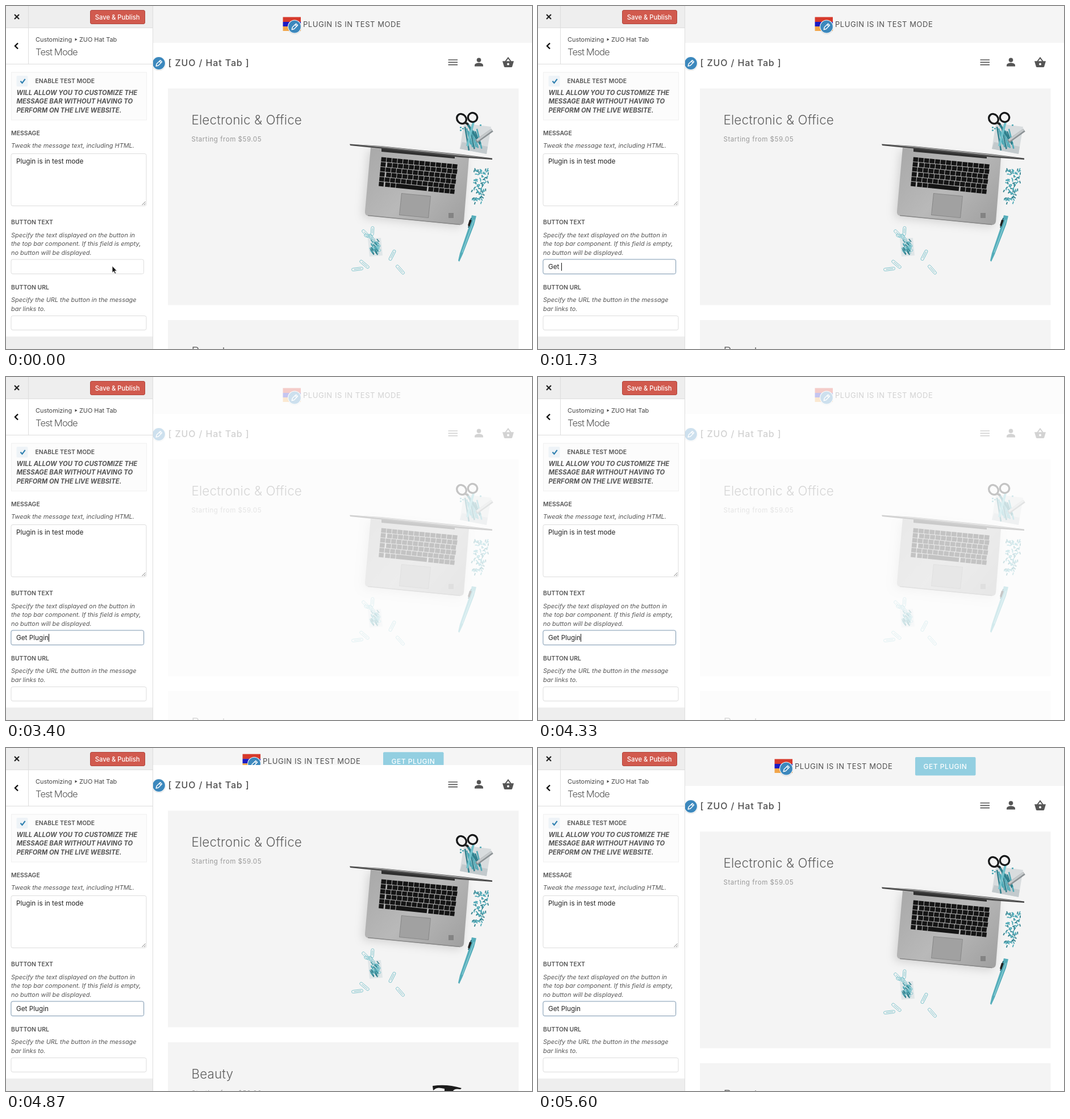
Write an HTML page with a canvas that moves like this. It is 926 by 605 pixels and loops after 5.67 s.

```html
<!DOCTYPE html>
<html lang="en">
<head>
<meta charset="utf-8">
<title>Test Mode</title>
<style>
html, body { margin: 0; width: 100%; height: 100%; overflow: hidden; background: #fff; }
#stage { position: relative; width: 926px; height: 605px; overflow: hidden; background: #fff; }
#view, #page, #bar, #side, #page > *, #bar > svg { position: absolute; left: 0; top: 0; }
#view { width: 926px; height: 605px; }
#bar { width: 926px; overflow: hidden; background: #f5f5f5; }
svg { display: block; font-family: Inter, "Open Sans", sans-serif; }
#side text { font-size: 11.2px; fill: #444; }
#side .label { font-size: 10.45px; font-weight: 600; fill: #555; }
#side .hint { font-size: 10.95px; font-style: italic; fill: #555; }
#side .strong { font-size: 11.25px; font-weight: 700; font-style: italic; fill: #555; }
#side .field { font-size: 11.75px; fill: #222; }
.head { font-size: 22.4px; font-weight: 300; letter-spacing: .15px; fill: #606060; }
.price { font-size: 11.5px; letter-spacing: .55px; fill: #999; }
.box { fill: #fff; stroke: #ddd; }
</style>
</head>
<body>
<div id="stage">
  <div id="view">
    <div id="page">
      <canvas id="art" width="926" height="700"></canvas>
      <svg width="926" height="700">
        <text x="285.5" y="106.3" font-size="16" font-weight="500" letter-spacing=".88" fill="#505050">[ ZUO / Hat Tab ]</text>
        <use href="#pencil" x="269" y="101"/>
        <path d="M778.5 95h16.5M778.5 99.3h16.5M778.5 103.6h16.5" stroke="#555" stroke-width="1.7"/>
        <g fill="#555">
          <circle cx="832.5" cy="95.3" r="3.8"/>
          <path d="M825 106.5v-2c0-3 5-4.3 7.5-4.3s7.5 1.3 7.5 4.3v2z"/>
        </g>
        <path d="M879 98l5-6.5 5 6.5" fill="none" stroke="#555" stroke-width="2"/>
        <path d="M874 97.2h20l-2.8 9.6q-.4 1.2-1.7 1.2h-11q-1.3 0-1.7-1.2z" fill="#555"/>
        <circle cx="884" cy="102.6" r="2" fill="#fff"/>
        <text class="head" x="326.5" y="209.3">Electronic &amp; Office</text>
        <text class="price" x="326.5" y="239">Starting from $59.05</text>
        <text class="head" x="326.5" y="618.3">Beauty</text>
        <text class="price" x="326.5" y="648">Starting from $59.00</text>
      </svg>
    </div>
    <div id="bar">
      <svg id="barArt" width="926" height="67">
        <g id="notice">
          <path d="M487.5 19.5h31.5v8.500h-31.5z" fill="#d63a2c"/>
          <path d="M487.5 28h31.5v8h-31.5z" fill="#1b1bc4"/>
          <path d="M487.5 36h31.5v8h-31.5z" fill="#f2a64a"/>
          <use href="#pencil" x="508" y="36.5"/>
          <text x="523" y="36.6" font-size="13" letter-spacing=".57" fill="#505050">PLUGIN IS IN TEST MODE</text>
        </g>
        <g id="button">
          <rect x="664" y="16" width="106.5" height="32.5" rx="2" fill="#93cfe1"/>
          <text x="678.5" y="36.6" font-size="12" font-weight="500" letter-spacing=".5" fill="#fff">GET PLUGIN</text>
        </g>
      </svg>
    </div>
  </div>

  <svg id="side" width="259" height="605">
    <defs>
      <g id="pencil">
        <circle r="12.5" fill="#000" opacity=".12" cy=".6"/>
        <circle r="12" fill="#fff"/>
        <circle r="10.9" fill="#3c88bd"/>
        <path d="M-4.8 5l1-4L2.6-5.3l2.9 2.9-6.3 6.400zM.8-3.6l2.9 2.9" fill="none" stroke="#fff" stroke-width="1.4" stroke-linejoin="round"/>
      </g>
    </defs>
    <rect width="259" height="605" fill="#fff"/>
    <rect width="259" height="39" fill="#eee"/>
    <rect y="583" width="259" height="22" fill="#eee"/>
    <path d="M0 38.5h258M39.5 0v102M0 102.5h258M258.5 0v605" stroke="#ddd"/>
    <path d="M15 15l8 8m0-8l-8 8" stroke="#222" stroke-width="2.2"/>
    <path d="M21 65.5l-5 5 5 5" fill="none" stroke="#111" stroke-width="2.4"/>
    <rect x="148.5" y="7.5" width="96" height="24" rx="2.5" fill="#d15a4e" stroke="#b2443b"/>
    <text x="156.8" y="23.7" font-weight="500" style="fill:#fff">Save &amp; Publish</text>
    <text x="52" y="62.6" style="font-size:10.9px">Customizing</text>
    <path d="M121.5 56.8l4 2.3-4 2.3z" fill="#444"/>
    <text x="129" y="62.6" style="font-size:10.9px">ZUO Hat Tab</text>
    <text x="52" y="87" style="font-size:16.5px;font-weight:300;letter-spacing:-.8px;fill:#555">Test Mode</text>

    <rect x="9.5" y="117" width="238" height="84" fill="#fcfcfc" stroke="#f0f0f0"/>
    <rect x="18.5" y="123" width="20" height="19" rx="2" fill="#eef3f7"/>
    <path d="M25.5 132.5l3 3.3 5.2-7" fill="none" stroke="#2f80b0" stroke-width="2.2"/>
    <text class="label" x="51.5" y="136.3">ENABLE TEST MODE</text>
    <text class="strong" x="18.5" y="156.5">WILL ALLOW YOU TO CUSTOMIZE THE</text>
    <text class="strong" x="18.5" y="172.1">MESSAGE BAR WITHOUT HAVING TO</text>
    <text class="strong" x="18.5" y="187.7">PERFORM ON THE LIVE WEBSITE.</text>

    <text class="label" x="9" y="227.8">MESSAGE</text>
    <text class="hint" x="9" y="250.3">Tweak the message text, including HTML.</text>
    <rect class="box" x="9" y="260.5" width="238" height="92" rx="3"/>
    <path d="M239.5 351l6-6m-2.5 6l2.5-2.5" stroke="#777"/>
    <text class="field" x="18" y="278">Plugin is in test mode</text>

    <text class="label" x="9" y="385">BUTTON TEXT</text>
    <text class="hint" x="9" y="407.7">Specify the text displayed on the button in</text>
    <text class="hint" x="9" y="423.3">the top bar component. If this field is empty,</text>
    <text class="hint" x="9" y="438.9">no button will be displayed.</text>
    <rect id="glow" x="9" y="447" width="233.5" height="25.5" rx="3" fill="none" stroke="#5b9dd9" stroke-opacity=".12" stroke-width="3"/>
    <rect id="entry" class="box" x="9" y="447" width="233.5" height="25.5" rx="3"/>
    <text id="typed" class="field" x="18" y="464.2"></text>
    <rect id="caret" y="453" width="1" height="14" fill="#111"/>

    <text class="label" x="9" y="499.8">BUTTON URL</text>
    <text class="hint" x="9" y="522.3">Specify the URL the button in the message</text>
    <text class="hint" x="9" y="537.9">bar links to.</text>
    <rect class="box" x="9" y="546.5" width="238" height="25" rx="3"/>
    <path id="mouse" d="M187 458.5v12l2.7-2.5 2 4.3 1.9-.9-2-4.2h3.7z" fill="#111" stroke="#fff" stroke-width=".8"/>
  </svg>
</div>

<script>
const $ = id => document.getElementById(id);
const c = $('art').getContext('2d');
const TEAL = '#4fa9b6', DARK_TEAL = '#2f7f8c', PALE_TEAL = '#7cc3cc';
let seed = 7;
const rnd = () => (seed = seed * 16807 % 2147483647) / 2147483647;

function poly(fill, ...p) {
  c.beginPath();
  for (let i = 0; i < p.length; i += 2) c.lineTo(p[i], p[i + 1]);
  c.closePath();
  c.fillStyle = fill;
  c.fill();
}
function line(color, width, x1, y1, x2, y2) {
  c.beginPath();
  c.moveTo(x1, y1);
  c.lineTo(x2, y2);
  c.strokeStyle = color;
  c.lineWidth = width;
  c.stroke();
}
function ring(x, y, rx, ry, turn, width, color) {
  c.beginPath();
  c.ellipse(x, y, rx, ry, turn, 0, 7);
  c.strokeStyle = color;
  c.lineWidth = width;
  c.stroke();
}
function clip(x, y, turn, len = 20, h = 5) {
  c.save();
  c.translate(x, y);
  c.rotate(turn);
  c.strokeStyle = PALE_TEAL;
  c.lineWidth = .9;
  c.beginPath();
  c.roundRect(-len / 2, -h / 2, len, h, h / 2);
  c.moveTo(-len / 2 + 4, 0);
  c.lineTo(len / 2 - 3, 0);
  c.stroke();
  c.restore();
}

// Keys live in unit coordinates on a skewed keyboard plane.
function key(u1, v1, u2, v2) {
  const at = (u, v) => [661 + 135 * u - 5 * v - 2 * u * v, 266 + 13 * u + 52 * v + u * v];
  poly('#151515', ...at(u1, v1), ...at(u2, v1), ...at(u2, v2), ...at(u1, v2));
}

function laptop() {
  const metal = c.createLinearGradient(640, 250, 800, 390);
  metal.addColorStop(0, '#a9a9a9');
  metal.addColorStop(.5, '#b9b9b9');
  metal.addColorStop(1, '#a0a0a0');
  c.save();
  c.shadowColor = 'rgba(0,0,0,.14)';
  c.shadowBlur = 16;
  c.shadowOffsetX = -4;
  c.shadowOffsetY = 4;
  c.beginPath();
  c.moveTo(642, 250);
  c.lineTo(815, 268);
  c.lineTo(806, 380);
  c.quadraticCurveTo(805, 387, 797, 386);
  c.lineTo(638, 370);
  c.quadraticCurveTo(631, 369, 632, 362);
  c.closePath();
  c.fillStyle = metal;
  c.fill();
  c.restore();
  line('#878787', 1.5, 637, 369.5, 799, 385.5);
  poly('#303030', 661, 251, 790, 264, 790, 269, 661, 257);
  poly('#484848', 605, 243.5, 660, 247, 800, 261.5, 856, 268.5, 856, 271, 800, 267, 660, 251.5, 606, 246);
  poly('#a8a8a8', 608, 244, 660, 247.5, 800, 262.3, 850, 268.5, 800, 264, 660, 249);

  for (let r = 0; r < 6; r++) {
    const v = r / 6 + .01, w = v + .147;
    for (let i = 0; i < 14; i++) {
      if (r === 5 && i > 3 && i < 9) continue;
      const u = i / 14 + (i ? (r % 2) * .012 : 0);
      key(u, v, Math.min(1, u + .064), w);
    }
  }
  key(4 / 14, 5 / 6 + .01, 8.9 / 14, .99);

  poly('#888', 696, 330, 748, 335, 744, 374, 692, 369);
  poly('#a1a1a1', 697, 331, 747, 336, 743, 373, 693, 368);
  poly('#838383', 779, 365, 788, 365, 788, 374, 779, 374);
}

function penHolder() {
  poly('#d8dcde', 806, 207, 854, 213, 846, 261, 799, 252);
  poly('#c3cacd', 803, 240, 848, 248, 846, 261, 799, 252);
  for (let i = 0; i < 8; i++) {
    line(i % 3 ? TEAL : DARK_TEAL, 2.5, 808 + i * 3, 213 + rnd() * 10, 815 + i * 3.2, 241 + rnd() * 15);
  }
  line(DARK_TEAL, 4, 811, 206, 835, 243);
  line('#70c1cb', 4, 823, 205, 812, 247);
  line('#8b9194', 6, 828, 239, 856, 219);
  line('#c5c9cb', 3.5, 829, 237, 855, 218);
  c.fillStyle = TEAL;
  for (const [x, y] of [[799, 213], [803, 215], [799, 218], [834, 209]]) c.fillRect(x, y, 3, 2.5);
  ring(802, 199, 7.8, 9, -.7, 3.3, '#17191a');
  ring(821.5, 196.5, 8.2, 8, .3, 3.3, '#17191a');
  line('#222', 3.5, 807, 205, 814, 209);
}

function smallThings() {
  for (let i = 0; i < 85; i++) {
    const v = Math.pow(rnd(), 1.25), spread = v < .65 ? 13 : 7;
    const x = 838 - v * 8 + (rnd() - .5) * 2 * spread, y = 286 + v * 60, a = rnd() * 3;
    line(i % 3 ? TEAL : DARK_TEAL, 1.8, x, y, x + 4.5 * Math.cos(a), y + 4.5 * Math.sin(a));
  }
  poly('#55adba', 820, 369, 828, 370.5, 824, 386, 804, 438, 798, 451, 796, 449, 799, 436, 816, 386);
  line('#2c6570', 2, 819, 374, 814, 391);
  line('#92d3da', 1.2, 824, 377, 803, 435);
  poly('#222', 816, 377, 820, 378, 816, 389, 813, 387);

  poly('#e0e6e8', 637, 410, 660, 409, 663, 440, 640, 442);
  for (let i = 0; i < 10; i++) clip(643 + rnd() * 12, 416 + rnd() * 16, rnd() * 3, 12, 4);
  for (let i = 0; i < 24; i++) {
    const x = 641 + rnd() * 13, y = 411 + rnd() * 24;
    line(i % 2 ? DARK_TEAL : TEAL, 1.6, x, y, x + 4, y + 5);
  }
  clip(633, 401, .8, 16);
  clip(645, 397, -1.5, 16);
  clip(638, 406, .3, 15);
  clip(644, 409, 1, 15);
  clip(618.5, 464, -.12);
  clip(631, 455.5, .7);
  clip(680, 439.5, -1.1);
  clip(694, 465, .85);
}

function bottle() {
  c.fillStyle = '#1c1c1c';
  c.beginPath();
  c.moveTo(752, 639);
  c.lineTo(751, 631);
  c.quadraticCurveTo(776, 627, 802, 635);
  c.lineTo(800, 637);
  c.quadraticCurveTo(789, 635, 787, 640);
  c.lineTo(787, 665);
  c.lineTo(772, 665);
  c.lineTo(772, 636);
  c.quadraticCurveTo(760, 633, 756, 636);
  c.fill();
}

c.fillStyle = '#fff';
c.fillRect(0, 0, 926, 700);
c.fillStyle = '#f4f4f4';
c.fillRect(285, 145.5, 617.5, 382);
c.fillRect(285, 554, 617.5, 146);
laptop();
penHolder();
smallThings();
bottle();

const LOOP = 5670, FOCUS = 330, FADE = 2080, RELOAD = 4684;
const PHRASE = 'Get Plugin';
const KEYS = [840, 1120, 1340, 1560, 1960, 2120, 2270, 2430, 2690, 2960];
const clamp = x => Math.max(0, Math.min(1, x));
const show = (id, on) => $(id).setAttribute('visibility', on ? 'visible' : 'hidden');
let shown = null, caretX = 18;

function draw() {
  const t = performance.now() % LOOP;
  const count = KEYS.filter(k => k <= t).length;
  const text = PHRASE.slice(0, count).replace(/ $/, '\u00a0');
  if (text !== shown) {
    $('typed').textContent = shown = text;
    caretX = 18 + (text ? $('typed').getComputedTextLength() : 0);
  }

  const focused = t >= FOCUS;
  const since = t - (count ? KEYS[count - 1] : FOCUS);
  $('caret').setAttribute('x', Math.round(caretX));
  show('caret', focused && Math.floor(since / 500) % 2 === 0);
  show('glow', focused);
  $('entry').style.stroke = focused ? '#8a9fb2' : '#ddd';
  show('mouse', t < 560);

  const fresh = t >= RELOAD;
  const open = fresh ? .5 - Math.cos(Math.PI * clamp((t - RELOAD) / 400)) / 2 : 1;
  $('view').style.opacity = fresh ? 1 : 1 - .75 * clamp((t - FADE) / 200);
  $('bar').style.height = (fresh ? 67 * open : 65) + 'px';
  $('barArt').style.transform = `translateY(${-16 * (1 - open)}px)`;
  $('page').style.transform = `translateY(${fresh ? Math.round(2 - 67 * (1 - open)) : 0}px)`;
  $('notice').setAttribute('transform', `translate(${fresh ? -71 : 0})`);
  show('button', fresh);
  requestAnimationFrame(draw);
}
draw();
</script>
</body>
</html>
```
